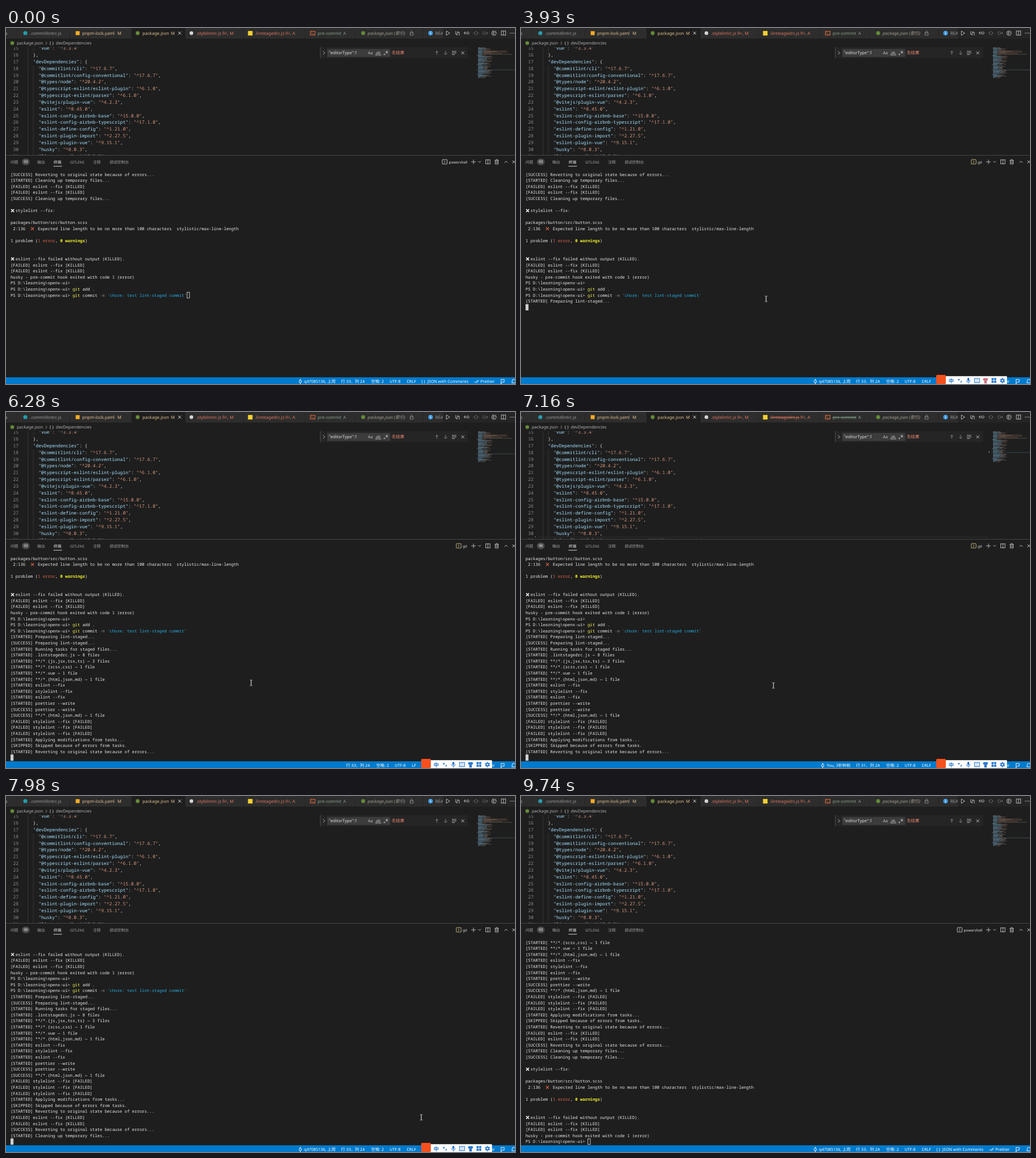
Recreate the animation shown at these times as an HTML page. Size 895 by 625 pixels, loop 9820 ms.

```html
<!DOCTYPE html>
<html lang="zh-CN">
<head>
<meta charset="utf-8">
<title>lint-staged commit</title>
<style>
  html, body { margin: 0; width: 100%; height: 100%; overflow: hidden; background: #1e1e1e; }
  svg { display: block; width: 895px; height: 625px; overflow: hidden; }
  text { font-family: 'Noto Sans', 'Noto Sans CJK SC', sans-serif; white-space: pre; text-rendering: geometricPrecision; }
  .mono text { font-family: 'Noto Sans Mono', 'DejaVu Sans Mono', monospace; }
  .code text { font-size: 7.97px; fill: #e0e0e0; }
  .term text { font-size: 7.28px; font-weight: 500; fill: #ececec; }
  .k { fill: #a4e2ff; } .s { fill: #dc9a7f; }
  .cmd { fill: #f9f650; } .opt { fill: #808080; } .str { fill: #25aee2; }
  .err { fill: #e2644a; } .warn { fill: #f0ee28; font-weight: bold; }
</style>
</head>
<body>
<svg id="stage" viewBox="0 0 895 625"></svg>
<script>
const LOOP = 9820;
const ROW = 10.6, COL = 4.365, TOP = 251.7, LAST_ROW = 33;

// Markup helpers
const rect = (x, y, w, h, fill, more = '') => `<rect x="${x}" y="${y}" width="${w}" height="${h}" fill="${fill}" ${more}/>`;
const dot = (x, y, r, fill) => `<circle cx="${x}" cy="${y}" r="${r}" fill="${fill}"/>`;
const text = (x, y, str, size, fill, more = '') => `<text x="${x}" y="${y}" font-size="${size}" fill="${fill}" ${more}>${str}</text>`;
const line = (d, color = '#c5c5c5', w = 0.9, more = '') => `<path d="${d}" fill="none" stroke="${color}" stroke-width="${w}" ${more}/>`;
const cross = (x, y, r, color, w) => line(`M${x - r} ${y - r}l${2 * r} ${2 * r}m0 ${-2 * r}l${-2 * r} ${2 * r}`, color, w);
const span = (cls, str) => `<tspan class="${cls}">${str}</tspan>`;
const group = (id, body, more = '') => `<g id="${id}" ${more}>${body}</g>`;

function tabBar() {
  const name = (x, str, fill, more) => text(x, 11.7, str, 7.6, fill, more);
  const tan = '#e2c08d', red = '#e0755c', green = '#86a08a', grey = '#9c9c9c';
  const starts = [0, 20, 113, 221, 316, 418, 527, 614, 734];
  const ends = [19, 112, 220, 315, 417, 526, 613, 733, 768];
  return rect(0, 0, 895, 18.5, '#252526')
    + starts.map((x, i) => rect(x, 0, ends[i] - x, 18.5, i === 3 ? '#1e1e1e' : '#2d2d2d')).join('')
    + name(-1, 's', grey)
    + dot(34, 9, 3.6, '#279ba8') + name(42.5, '.commitlintrc.js', grey)
    + rect(122.5, 5.5, 7, 7, '#f2ab27') + name(134, 'pnpm-lock.yaml', tan) + name(196, 'M', tan)
    + dot(231.5, 9, 3.4, '#648a38') + name(240, 'package.json', tan) + name(290, 'M', tan)
    + cross(305.3, 9, 2.6, '#e8e8e8', 1)
    + dot(326, 9, 3.2, '#cfd4d6') + name(334.5, '.stylelintrc.js', red) + name(380.5, '9+, M', red)
    + rect(425.5, 5.2, 8, 8, '#f3d12f') + name(437.5, '.lintstagedrc.js', red, 'class="gone"') + name(491, '9+, A', red)
    + rect(535.3, 5.8, 8, 6.6, 'none', 'stroke="#d8683c" stroke-width="1.1"') + line('M537 7.6l1.6 1.5l-1.6 1.5m2.6 0h2', '#d8683c')
    + name(548, 'pre-commit', green, 'class="gone"') + name(593, 'A', green)
    + dot(628, 9, 3.4, '#648a38') + name(636, 'package.json (索引)', '#a39c90', 'font-style="italic"')
    + rect(710.5, 8.5, 5.4, 4, 'none', 'stroke="#999" stroke-width=".8"') + line('M711.6 8.5v-1.6a1.6 1.6 0 0 1 3.2 0v1.6', '#999', 0.8)
    + dot(746.5, 9, 4, '#3f9be8') + rect(746, 8.2, 1, 3, '#fff') + rect(746, 6.3, 1, 1, '#fff')
    + name(755, 'REA', '#9a9a9a') + rect(768, 0, 127, 18.5, '#252526')
    + line('M774.3 5.2v7.6l6-3.8z')
    + line('M790.8 5.5v5.5h3M797 13V7.5h-3M795 5.8l-1.6 1.7l1.6 1.7M792.4 9.4l1.6 1.7l-1.6 1.7')
    + line('M808 6l-2.6 2.8l2.6 2.8M805.6 8.8h4M810.2 8.8a2 2 0 1 0 4 0a2 2 0 1 0-4 0')
    + line('M823.5 9a2.8 2.8 0 1 0 5.6 0a2.8 2.8 0 1 0-5.6 0M821.5 9h2m5.6 0h2', '#686868')
    + line('M838.4 9a2.5 2.5 0 1 0 5 0a2.5 2.5 0 1 0-5 0M843.4 9h3.6m-2-2.3l2.2 2.3l-2.2 2.3', '#686868')
    + line('M854.2 9a3.9 3.9 0 1 0 7.8 0a3.9 3.9 0 1 0-7.8 0M857 5.6v6.6M857 9.8l3.2-2.4')
    + rect(871, 5.2, 7.6, 7.4, 'none', 'stroke="#c5c5c5" stroke-width=".9"') + line('M874.8 5.2v7.4')
    + dot(887, 9, 0.8, '#c5c5c5') + dot(890, 9, 0.8, '#c5c5c5') + dot(893, 9, 0.8, '#c5c5c5');
}

function breadcrumb() {
  return rect(0, 18.5, 895, 15, '#1e1e1e') + dot(11, 26.5, 3.3, '#648a38')
    + text(19, 29.2, 'package.json', 7.5, '#b0b0b0') + line('M69.6 24l2.4 2.5l-2.4 2.5', '#b0b0b0', 0.8)
    + text(76.5, 29.2, '{ }', 7.3, '#d8d8d8') + text(87.5, 29.2, 'devDependencies', 7.55, '#b0b0b0');
}

function editor() {
  const deps = [
    '@commitlint/cli 17.6.7', '@commitlint/config-conventional 17.6.7', '@types/node 20.4.2',
    '@typescript-eslint/eslint-plugin 6.1.0', '@typescript-eslint/parser 6.1.0', '@vitejs/plugin-vue 4.2.3',
    'eslint 8.45.0', 'eslint-config-airbnb-base 15.0.0', 'eslint-config-airbnb-typescript 17.1.0',
    'eslint-define-config 1.21.0', 'eslint-plugin-import 2.27.5', 'eslint-plugin-vue 9.15.1', 'husky 8.0.3'];
  const y = n => 50.2 + (n - 16) * 11.82;
  const row = (n, x, body) => `<text x="${x}" y="${y(n)}">${body}</text>`;
  const dep = (n, item, comma = ',') => {
    const [key, ver] = item.split(' ');
    return row(n, 57.2, `${span('k', `"${key}"`)}: ${span('s', `"^${ver}"`)}${comma}`);
  };
  let out = line('M38.5 33V223M48 33v9M48 66V223', '#404040', 0.7);
  for (let n = 15; n <= 31; n++) out += `<text x="22" y="${y(n)}" text-anchor="end" style="fill:#8c8c8c">${n}</text>`;
  out += dep(15, 'vue 3.3.4', '') + row(16, 47.6, '},') + row(17, 47.6, span('k', '"devDependencies"') + ': {');
  deps.forEach((item, i) => out += dep(18 + i, item));
  out += group('line31', dep(31, 'lint-staged 13.2.3'));
  out += group('reverted', dep(31, 'rimraf 5.0.1') + line('M30 219.6H822', '#303030', 0.9) + rect(25, 218.5, 1, 1.5, '#aaa')
    + `<text x="205" y="${y(31)}" style="fill:#555;font-family:'Noto Sans','Noto Sans CJK SC',sans-serif">You, 3秒钟前 · Uncommitted changes</text>`
    + rect(822.5, 69.3, 1.5, 1.5, '#aaa'));
  return `<g class="mono code" clip-path="url(#editorClip)">${out}</g>`;
}

function minimap() {
  let seed = 7, out = '';
  const rnd = () => (seed = seed * 16807 % 2147483647) / 2147483647;
  for (let i = 0; i < 46; i++) {
    const y = 34 + i * 1.17, long = i > 4 && i < 11, head = i % 14 === 12;
    const x = head ? 828 : 830, key = head ? 9 : 4 + rnd() * (long ? 6 : 14);
    out += rect(x, y, key, 0.75, '#7fb4d2', 'opacity=".6"');
    if (!head) out += rect(x + key + 1, y, long ? 12 + rnd() * 46 : 5 + rnd() * 3, 0.75, long && i % 2 ? '#a9785f' : '#9a8272', 'opacity=".6"');
  }
  return out + rect(827, 73, 68, 0.9, '#3b4c59', 'id="mapLine"');
}

function findBox() {
  const t = (x, str, fill, more) => text(x, 46.3, str, 7.5, fill, more);
  return rect(552, 33.5, 260, 19.5, '#252526') + rect(552, 33.5, 1.2, 19.5, '#454545')
    + rect(565, 36.8, 110.5, 14, '#3c3c3c') + line('M557.5 40.7l3 3l-3 3')
    + t(567.8, '"editorType":1', '#dedede') + text(636.6, 46.2, 'Aa', 6.8, '#d0d0d0')
    + text(650.5, 46, 'ab', 6.8, '#d0d0d0') + line('M650 46v1.6h9V46', '#c5c5c5', 0.7)
    + rect(664.3, 45.3, 2, 2, '#c5c5c5') + line('M669.6 40v5M667.4 41.2l4.4 2.6m0-2.6l-4.4 2.6', '#c5c5c5', 0.8)
    + t(678, '无结果', '#f08a70')
    + line('M757.5 47V40.5M754.7 43.2l2.8-2.8l2.8 2.8M773 40.2v6.6M770.2 44l2.8 2.8l2.8-2.8', '#8a8a8a')
    + line('M784 41h8M784 43.8h8M784 46.6h5.5') + cross(803.2, 43.7, 2.5, '#c5c5c5', 1);
}

function panelHead() {
  const t = (x, str, fill = '#a4a4a4', size = 6.8) => text(x, 237.5, str, size, fill);
  const shellIcon = (x, c) => rect(x, 231, 8.4, 7.8, 'none', `stroke="${c}" stroke-width=".9" rx=".8"`) + line(`M${x + 3} 232.8l2.2 2.1l-2.2 2.1`, c);
  return line('M0 223.5H895', '#454545', 1)
    + t(8, '问题') + rect(28, 229.3, 13.6, 11.4, '#4d4d4d', 'rx="5.7"')
    + text(34.8, 237.4, '93', 6.4, '#fff', 'id="badge" text-anchor="middle"')
    + t(55, '输出') + t(83.8, '终端', '#f0f0f0') + rect(83.5, 242.3, 15, 0.9, '#e7e7e7')
    + t(112.5, 'GITLENS', '#a4a4a4', 6.3) + t(153, '注释') + t(182, '调试控制台')
    + group('shell', shellIcon(767.2, '#d0d0d0') + t(778.5, 'powershell', '#e2e2e2', 6.4))
    + group('git', shellIcon(791.8, '#d3c08a') + t(803, 'git', '#e2e2e2', 6.4))
    + line('M822 231v8M818 235h8M830.3 233.8l2.3 2.3l2.3-2.3M847.3 231.3v7.2')
    + rect(843.5, 231.3, 7.6, 7.2, 'none', 'stroke="#c5c5c5" stroke-width=".9"')
    + line('M859.3 232.6h7.2M861.4 232.5v-1.4h3v1.4M860.3 232.6v6.3h5.2v-6.3M862 234.3v3M863.8 234.3v3')
    + line('M876.5 236.6l2.8-2.8l2.8 2.8') + cross(892.8, 235, 2.5, '#c5c5c5', 1);
}

// Terminal log
const PROMPT = 'PS D:\\learning\\openx-ui> ';
const started = s => '[STARTED] ' + s, success = s => '[SUCCESS] ' + s;
const revert = 'Reverting to original state because of errors...', clean = 'Cleaning up temporary files...';
const prep = 'Preparing lint-staged...', html = '**/*.{html,json,md} — 1 file', write = 'prettier --write';
const killed = '[FAILED] eslint --fix [KILLED]', failed = '[FAILED] stylelint --fix [FAILED]';
const report = [
  success(clean), '', '✕ stylelint --fix:', '', 'packages/button/src/button.scss',
  ' 2:136  ✖  Expected line length to be no more than 100 characters  stylistic/max-line-length', '',
  `1 problem (${span('err', '1 error')}, ${span('warn', '0 warnings')})`, '', '',
  '✕ eslint --fix failed without output (KILLED).', killed, killed,
  'husky - pre-commit hook exited with code 1 (error)'];
const log = [
  success(revert), started(clean), killed, killed, ...report,
  PROMPT, `${PROMPT}${span('cmd', 'git')} add .`,
  `${PROMPT}${span('cmd', 'git')} commit ${span('opt', '-m')} ${span('str', "'chore: test lint-staged commit'")}`,
  started(prep), success(prep),
  ...['Running tasks for staged files...', '.lintstagedrc.js — 8 files', '**/*.{js,jsx,tsx,ts} — 3 files',
    '**/*.{scss,css} — 1 file', '**/*.vue — 1 file', html, 'eslint --fix', 'stylelint --fix', 'eslint --fix', write].map(started),
  success(write), success(html), failed, failed, failed,
  started('Applying modifications from tasks...'), '[SKIPPED] Skipped because of errors from tasks.',
  started(revert), killed, killed, success(revert), started(clean), ...report, PROMPT];

function terminal() {
  const rows = log.map((s, i) => {
    const mid = TOP + ROW * (i + 0.5);
    let marks = '';
    if (s[0] === '✕') marks = cross(11.6, mid, 2.5, '#f0f0f0', 1.5);
    if (s.includes('✖')) marks = cross(46.5, mid, 2.5, '#e2644a', 1.2);
    return `<g class="row"><text x="8" y="${mid + 2.6}">${s.replace(/[✕✖]/, ' ')}</text>${marks}</g>`;
  }).join('');
  return `<g class="mono term" clip-path="url(#termClip)">${group('rows', rows)}</g>`
    + rect(0, 0, COL, ROW - 0.6, '#d2d2d2', 'id="caret" stroke="#d2d2d2" stroke-width=".9"');
}

function statusBar() {
  const t = (x, str, more) => text(x, 623.2, str, 7.2, '#fff', more);
  const commit = x => line(`M${x} 616v2m0 5v2M${x - 2.1} 620.5a2.1 2.1 0 1 0 4.2 0a2.1 2.1 0 1 0-4.2 0`, '#fff', 1);
  return rect(0, 613.2, 895, 12, '#007acc')
    + group('lastWeek', commit(517.5) + t(579.5, 'q47085136, 上周', 'text-anchor="end"'))
    + group('justNow', commit(530.5) + t(579.5, 'You, 3秒钟前', 'text-anchor="end"'))
    + group('fileInfo', t(589, '行 33，列 24', 'id="pos"') + t(642, '空格: 2') + t(674.5, 'UTF-8'))
    + t(721, 'CRLF', 'id="eol" text-anchor="end"') + t(730, '{ }') + t(741, 'JSON with Comments')
    + line('M823.5 620.5l2 2.2l4-4.6M827 622.4l.6.4l4-4.6', '#fff') + t(834, 'Prettier')
    + line('M870.5 617h5.5v4.5h-3l-2 2v-2h-.5zM869 624.5a2 2 0 0 1 3 0', '#fff')
    + line('M889 623h6M890 623v-3.4a2.8 2.8 0 0 1 5.6 0', '#fff');
}

function inputBar() {
  const blue = '#2a78d2';
  return group('ime', rect(746, 611.2, 108.5, 14, '#fff', 'rx="1"') + rect(730, 609, 17, 16, '#f4511e', 'rx="2"')
    + text(751.8, 622.6, '中', 9.4, blue, 'font-weight="bold"')
    + dot(769.8, 617.5, 1.4, blue) + line('M774 619.5q1 1.5-.8 3', blue, 1.5)
    + rect(784.9, 614, 3.4, 6, blue, 'rx="1.7"') + line('M783.3 618.5a3.3 3.3 0 0 0 6.6 0M786.6 621.8v2.2', blue, 1)
    + rect(797.4, 615.2, 9, 7.4, 'none', `stroke="${blue}" stroke-width="1.1"`)
    + line('M799 617.5h6M799 620.5h6', blue, 1.1, 'stroke-dasharray="1.2 .8"')
    + `<path id="shirt" d="M812 616.2l3-2q1.8 1.4 3.6 0l3 2l-1.3 2.7l-1.2-.5v5.6h-4.6v-5.6l-1.2.5z"/>`
    + [0, 1, 2, 3].map(i => rect(827.3 + i % 2 * 4.6, 614.5 + (i >> 1) * 4.6, 3.8, 3.8, blue, 'rx=".7"')).join('')
    + dot(846.6, 619, 3.5, blue) + line('M846.6 614.2v9.6M842.5 616.6l8.2 4.8m0-4.8l-8.2 4.8', blue, 1.5) + dot(846.6, 619, 1.4, '#fff'));
}

const beam = group('beam', line('M-2.4-4.8h1.7q.7 0 .7.7V4.1q0 .7-.7.7H-2.4M2.4-4.8H.7q-.7 0-.7.7V4.1q0 .7.7.7H2.4', '#d0d0d0', 0.8));

document.getElementById('stage').innerHTML =
  `<clipPath id="editorClip"><rect y="33.5" width="895" height="189.5"/></clipPath>
   <clipPath id="termClip"><rect y="252.5" width="895" height="360.5"/></clipPath>`
  + editor() + minimap() + breadcrumb() + tabBar() + findBox() + panelHead() + terminal() + statusBar() + inputBar() + beam;

// Timeline
const output = [[0, 21], [3290, 22], [4130, 33], [4480, 35], [6280, 41], [7440, 43], [7800, 45], [8390, 46], [8660, 60]];
const pointer = [[130, 640, 634], [480, 520, 548], [760, 440, 481], [890, 431, 475.5], [6950, 431, 475.5],
  [7160, 443.5, 480], [7500, 570, 520], [7980, 730, 564], [8300, 792, 602], [8460, 812, 634]];
const shirtTint = [[3290, 42, 120, 210], [3500, 80, 150, 200], [3930, 205, 115, 130], [4300, 190, 100, 190],
  [4680, 125, 100, 215], [5400, 70, 110, 220], [6140, 42, 120, 210]];

function tween(keys, t) {
  const i = keys.findIndex(k => k[0] > t);
  if (i === 0) return keys[0].slice(1);
  if (i < 0) return keys[keys.length - 1].slice(1);
  const a = keys[i - 1], b = keys[i], p = (t - a[0]) / (b[0] - a[0]);
  return a.slice(1).map((v, j) => v + (b[j + 1] - v) * p);
}

const el = id => document.getElementById(id);
const show = (id, on) => el(id).style.display = on ? '' : 'none';
const attr = (id, key, val) => el(id).setAttribute(key, val);
const label = (id, str) => { if (el(id).textContent !== str) el(id).textContent = str; };
const rows = [...document.querySelectorAll('.row')], gone = [...document.querySelectorAll('.gone')];

function draw(t) {
  const within = (a, b) => t >= a && t < b;
  const count = output.filter(s => s[0] <= t).pop()[1];
  const typing = t < 1220, prompt = count === log.length;
  const caretRow = typing || prompt ? count - 1 : count;
  const scroll = Math.max(0, caretRow - LAST_ROW);
  rows.forEach((r, i) => r.style.display = i < count ? '' : 'none');
  attr('rows', 'transform', `translate(0 ${-scroll * ROW})`);

  const focused = within(820, 9740);
  attr('caret', 'x', 8.4 + COL * (typing ? 71 : prompt ? 25 : 0));
  attr('caret', 'y', TOP + ROW * (caretRow - scroll) + 0.3);
  attr('caret', 'fill', focused ? '#d2d2d2' : 'none');
  show('ime', focused);

  const busy = within(2500, 9150), rewritten = within(4480, 7020), reverted = within(7020, 7370);
  show('git', busy);
  show('shell', !busy);
  show('lastWeek', !rewritten && !reverted);
  show('justNow', reverted);
  show('reverted', reverted);
  show('line31', !reverted);
  label('eol', rewritten ? 'LF' : 'CRLF');
  label('pos', reverted ? '行 31，列 24' : '行 33，列 24');
  label('badge', within(7020, 8800) ? '90' : '93');
  attr('fileInfo', 'transform', `translate(${rewritten ? 9 : 0} 0)`);
  attr('mapLine', 'y', reverted ? 70.6 : 73);
  gone.forEach(g => g.style.textDecoration = reverted ? 'line-through' : 'none');

  attr('shirt', 'fill', `rgb(${tween(shirtTint, t).map(Math.round)})`);
  attr('beam', 'transform', `translate(${tween(pointer, t)})`);
}

const begin = performance.now();
function tick() {
  draw((performance.now() - begin) % LOOP);
  requestAnimationFrame(tick);
}
tick();
</script>
</body>
</html>
```
